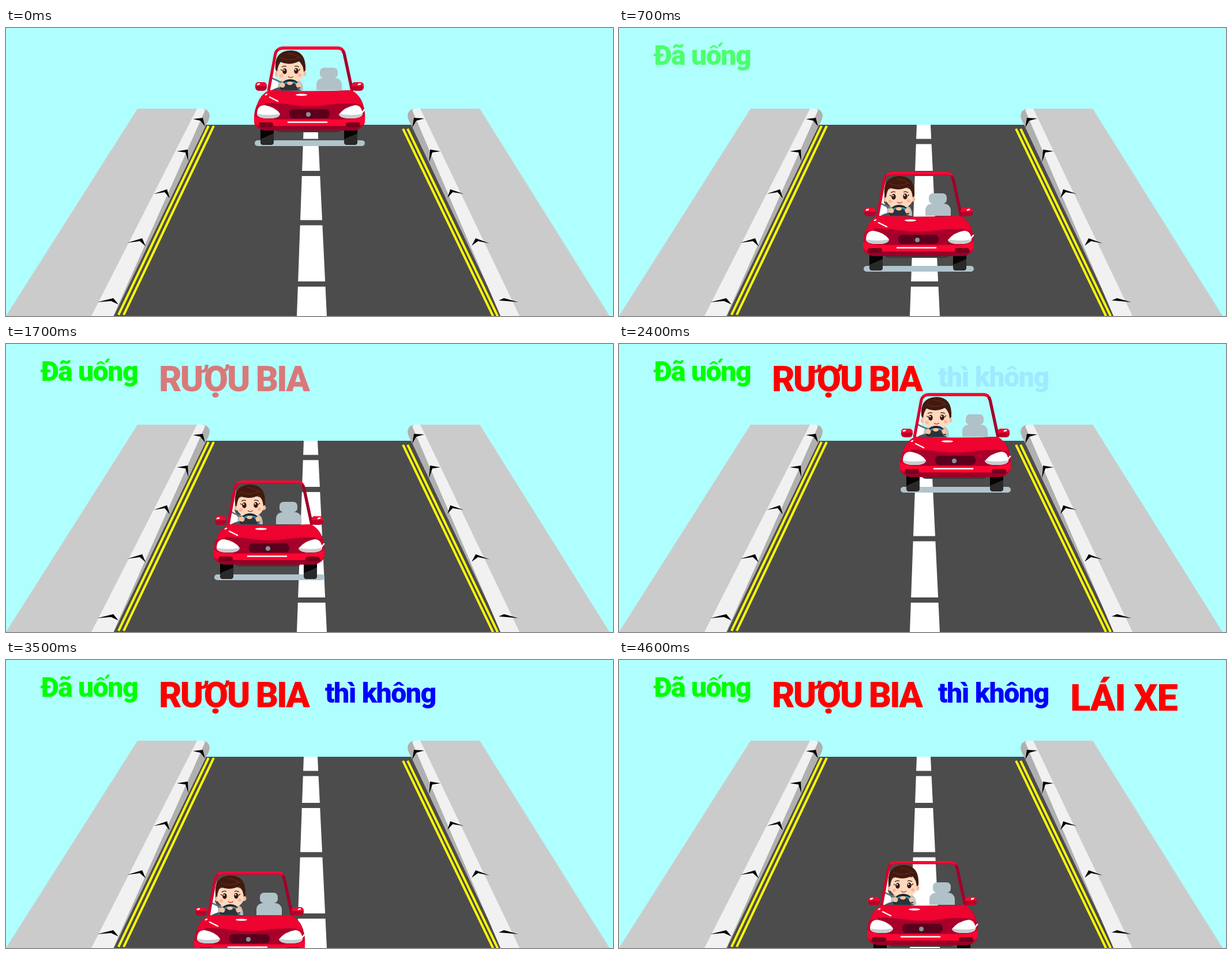
An HTML page for the animation above (4.7 s loop, 1052 by 500 pixels).

```html
<!DOCTYPE html>
<html lang="vi">
<head>
<meta charset="utf-8">
<title>Swerving car</title>
<style>
  html, body { margin: 0; width: 100%; height: 100%; overflow: hidden; background: #b0ffff; }
  svg { display: block; width: 1052px; height: 500px; }
  text { font-family: Roboto, "Open Sans", sans-serif; font-weight: 900; white-space: pre; }
  .small { font-size: 48px; letter-spacing: -1.4px; }
</style>
</head>
<body>
<svg viewBox="0 0 1052 500">
  <rect width="1052" height="500" fill="#b0ffff"/>

  <g id="road">
    <path d="M346 168H703L862 500H186Z" fill="#4c4c4c"/>
    <path d="M228 140H334L152 500H0ZM821 140H716L886 500H1046Z" fill="#cbcbcb"/>
    <path d="M340 140Q352 141 353 152Q352 160 348 166L187 500H180ZM709 140Q697 141 696 152Q697 160 701 166L859 500H865Z" fill="#b0b0b0"/>
    <path d="M331 140H341Q346 141 344 145L186 500H148ZM718 140H708Q703 141 705 145L857 500H890Z" fill="#f1f1f1"/>
    <path d="M351 170L195 498M360 170L204 498M688 175L844 500M696 175L852 500" stroke="#ff0" stroke-width="4" fill="none"/>
    <path d="M516 168H540L556 500H504Z" fill="#fff"/>
    <path d="M500 192.500h60v9h-60zM500 248h60v9h-60zM500 333.500h60v9h-60zM500 440h60v9h-60z" fill="#4c4c4c"/>
    <g id="chevrons"></g>
  </g>

  <g id="car">
    <rect x="431" y="195" width="191" height="10" rx="5" fill="#b0c4cc"/>
    <path d="M468 172H580V177Q579 181 572 181H476Q469 181 468 177Z" fill="#393939"/>
    <g fill="#050505">
      <rect x="441" y="170" width="23" height="33" rx="5"/>
      <rect x="586" y="170" width="23" height="33" rx="5"/>
    </g>
    <path d="M441 193L464 183V198Q464 203 459 203H446Q441 203 441 198ZM586 193L609 183V198Q609 203 604 203H591Q586 203 586 198Z" fill="#292929"/>

    <!-- cabin -->
    <path d="M469 45L455 108H478L466 84Z" fill="#fff"/>
    <g fill="#b1c1c8">
      <path d="M471 108Q470 91 480 90H505Q515 92 515 108Z"/>
      <rect x="544" y="69" width="31" height="18" rx="7"/>
      <path d="M553 84H567V90H553ZM538 108V97Q539 88 549 87H571Q581 88 582 98V108Z"/>
    </g>
    <path d="M459 86L478 95" stroke="#65747c" stroke-width="3"/>
    <path d="M459 109Q468 102 484 102Q505 102 512 109Z" fill="#46565e"/>

    <!-- driver -->
    <path d="M477 108Q478 94 491 93Q504 94 506 108Z" fill="#2b343b"/>
    <circle cx="516" cy="79" r="4.500" fill="#f6bd98"/>
    <circle cx="470" cy="80" r="4" fill="#f6bd98"/>
    <path d="M470 64Q493 52 516 64V80Q512 95 493 95Q475 95 470 81Z" fill="#ffd9bd"/>
    <path d="M467 72Q464 40 493 39Q521 39 519 74L516 76Q515 64 508 58Q490 66 476 59Q471 65 470 76Z" fill="#43190f"/>
    <path d="M476 52Q492 59 508 51M488 44Q501 45 511 53" stroke="#6b3020" stroke-width="1" fill="none"/>
    <g fill="#3b1712">
      <ellipse cx="483" cy="75" rx="3.700" ry="5"/>
      <ellipse cx="503" cy="74.500" rx="3.700" ry="5"/>
    </g>
    <path d="M478 68Q482 65 486 67M500 67Q504 65 508 68M476 72L479 74M507 74L510 71" stroke="#43190f" stroke-width="1.300" fill="none"/>
    <g fill="#fff"><circle cx="482" cy="73" r="1.200"/><circle cx="502" cy="72.500" r="1.200"/></g>
    <g fill="#ffb49e"><circle cx="477" cy="83" r="3"/><circle cx="509" cy="82" r="3"/></g>
    <path d="M489 84Q493 88 498 84" stroke="#c84338" stroke-width="1.500" fill="none"/>
    <path d="M477 106Q478 92 492 91Q506 91 508 105" stroke="#17242c" stroke-width="4" fill="none"/>
    <path d="M483 96L489 94M497 94L505 97" stroke="#318bb8" stroke-width="3"/>
    <g fill="#f9c19b"><circle cx="479" cy="99" r="4.500"/><circle cx="507" cy="99" r="4.500"/><ellipse cx="492" cy="96" rx="5" ry="3"/></g>

    <!-- window frame -->
    <path d="M455 109L467 44Q470 35 480 35H575Q584 35 586 44L600 109" fill="none" stroke="#d4002d" stroke-width="5"/>
    <path d="M583 40Q586 42 587 48L600 109" fill="none" stroke="#a0002b" stroke-width="5"/>
    <path d="M471 37Q475 34 482 34H574Q580 34 583 37" fill="none" stroke="#ff0833" stroke-width="4"/>

    <!-- body -->
    <g fill="#b80029">
      <rect x="432" y="94" width="20" height="15" rx="6"/>
      <rect x="599" y="94" width="21" height="15" rx="6"/>
    </g>
    <path d="M436 94H447Q452 95 452 101H432Q432 95 436 94ZM604 94H615Q620 95 620 101H599Q600 95 604 94Z" fill="#f20831"/>
    <path d="M456 108Q526 111 599 108Q616 118 620 137Q623 147 622 163Q620 174 607 177H445Q431 174 430 163Q429 145 435 133Q441 115 456 108Z" fill="#c9002c"/>
    <path d="M457 108Q526 112 598 108Q613 116 618 133Q579 129 555 133Q526 137 497 133Q472 129 435 134Q442 114 457 108Z" fill="#ef0330"/>
    <path d="M448 130Q480 130 499 135Q526 139 555 135Q579 130 607 131L585 158H466Z" fill="#a7002a"/>
    <path d="M430 152Q441 159 459 159H594Q612 159 622 152V164Q618 170 608 170H444Q433 170 430 163Z" fill="#ff0532"/>
    <path d="M437 170H616Q612 177 604 178H448Q440 177 437 170Z" fill="#9a0027"/>
    <rect x="491" y="141" width="70" height="16" rx="7" fill="#5a001c"/>
    <circle cx="524" cy="150" r="4" fill="#82939b"/>
    <path d="M435 150Q435 134 448 134Q467 137 475 149Q474 157 455 157Q437 157 435 150ZM618 150Q617 134 605 134Q587 137 577 150Q579 157 597 157Q616 157 618 150Z" fill="#fff"/>
    <path d="M435 149Q454 153 475 149Q474 157 455 157Q437 157 435 149ZM618 149Q599 153 577 149Q579 157 597 157Q616 157 618 149Z" fill="#c7cdcf"/>
    <g fill="#74001f">
      <rect x="438" y="164" width="25" height="8" rx="4"/>
      <rect x="589" y="164" width="25" height="8" rx="4"/>
    </g>
    <path d="M489 163.500H556" stroke="#fff" stroke-width="2.500" stroke-linecap="round"/>
    <ellipse cx="512" cy="116" rx="10" ry="1.800" fill="#fff"/>
    <path d="M457 120L471 127M450 116L452 115M617 147L621 142M436 98L439 97M611 98L614 97" stroke="#fff" stroke-width="2.500" stroke-linecap="round"/>
  </g>

  <g id="words">
    <text class="small" x="60" y="64" fill="#0f0">Đã uống</text>
    <text x="265" y="82" fill="#f00" font-size="61" letter-spacing="-3">RƯỢU BIA</text>
    <text class="small" x="553" y="74" fill="#00f">thì không</text>
    <text x="782" y="88" fill="#f00" font-size="65" letter-spacing="-1.400">LÁI XE</text>
  </g>
</svg>
<script>
const LOOP = 4700, STEP = 100;
const car = document.getElementById('car');
const words = [...document.querySelectorAll('#words text')];

// Each drive starts again at the top: [ms, x, y]
const drives = [
  [[0, 0, 0], [600, -6, 190], [700, -7, 218], [1050, 0, 317], [1200, 0, 317]],
  [[1300, 0, 0], [1400, 25, 52], [1500, 10, 103], [1700, -70, 205], [1800, -85, 256], [2000, 0, 340]],
  [[2100, 0, 0], [2200, 90, 20], [2300, 125, 38], [2400, 57, 53], [2500, -22, 75],
   [2600, -75, 95], [2700, -85, 112], [2800, -55, 128], [2900, -4, 142], [3000, 65, 153],
   [3100, 125, 187], [3200, 105, 225], [3300, 40, 263], [3500, -104, 335], [3600, -136, 365], [3700, -143, 395]],
  [[3800, 0, 0], [4200, -5, 158], [4600, 0, 317]]
];
const fades = [[0, 1230], [1100, 1150], [2300, 1200], [3600, 1000]];

// Curb arrows: outer end, apex, inner end
const arrows = [
  [324, 158, 341, 156, 345, 171], [296, 214, 315, 211, 316, 231],
  [256, 288, 279, 280, 284, 296], [210, 373, 236, 365, 242, 379],
  [158, 476, 186, 469, 195, 480],
  [725, 157, 707, 156, 704, 173], [753, 214, 735, 211, 733, 233],
  [793, 288, 770, 280, 765, 295], [838, 374, 814, 365, 807, 378],
  [888, 476, 863, 469, 854, 473]
];
document.getElementById('chevrons').innerHTML = arrows.map(([ax, ay, x, y, bx, by]) => {
  const side = ax < x ? -4 : 4;
  return `<path d="M${ax} ${ay}L${x} ${y}L${bx} ${by}L${x + side} ${y + 5}Z"/>`;
}).join('');

function carAt(t) {
  const keys = drives.filter(d => d[0][0] <= t).pop();
  const next = keys.findIndex(k => k[0] > t);
  if (next < 0) return keys[keys.length - 1].slice(1);
  const a = keys[next - 1], b = keys[next], u = (t - a[0]) / (b[0] - a[0]);
  return [a[1] + (b[1] - a[1]) * u, a[2] + (b[2] - a[2]) * u];
}

function draw(now) {
  const t = Math.floor((now % LOOP) / STEP) * STEP;
  const [x, y] = carAt(t);
  car.setAttribute('transform', `translate(${Math.round(x)} ${Math.round(y)})`);
  words.forEach((word, i) => {
    const [start, length] = fades[i];
    word.setAttribute('opacity', Math.min(1, Math.max(0, (t - start) / length)));
  });
}

const begin = performance.now();
function tick() {
  draw(performance.now() - begin);
  requestAnimationFrame(tick);
}
tick();
</script>
</body>
</html>
```
